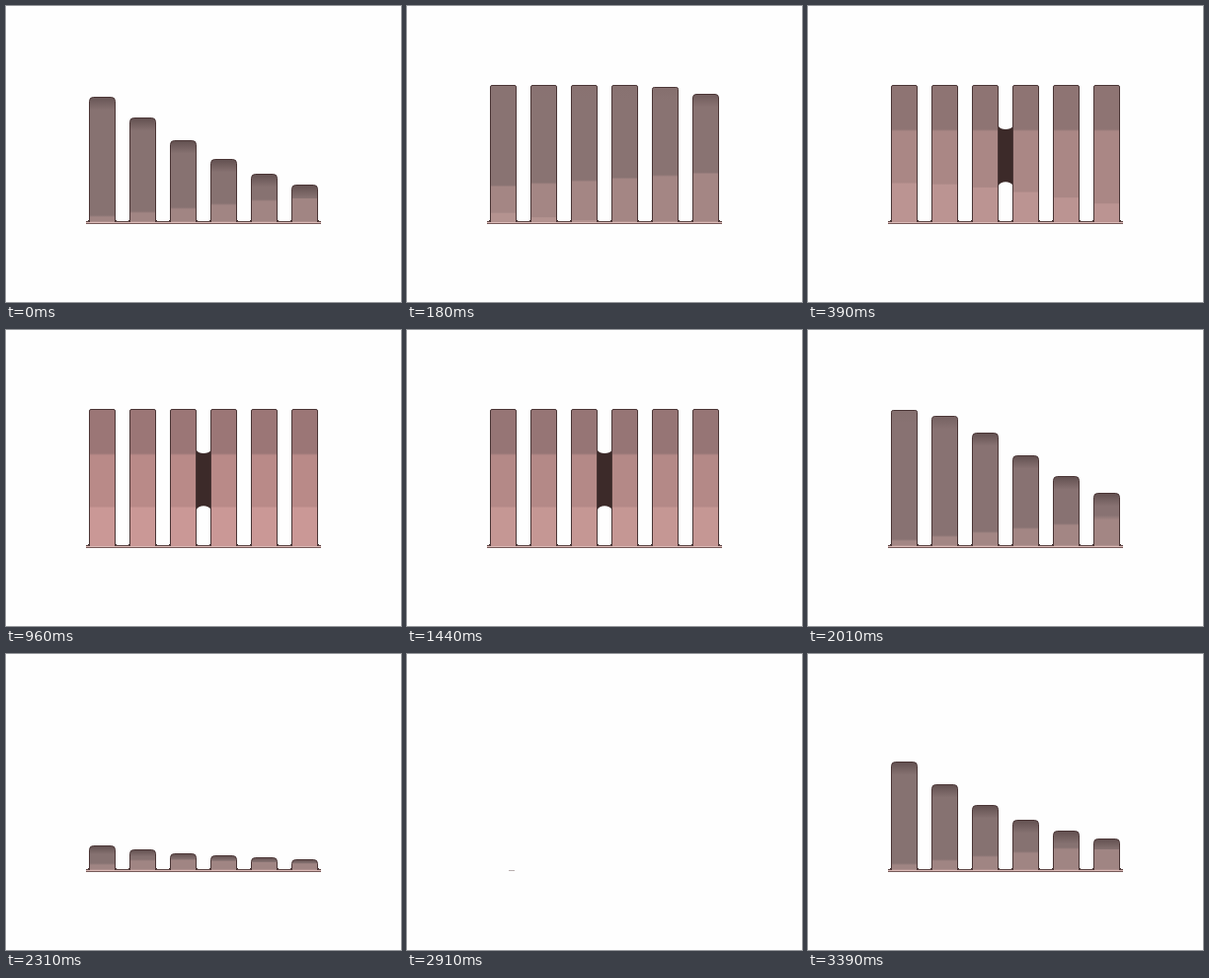
An HTML page with a canvas that plays this animation: 400x300 px, repeating every 3420 ms.

```html
<!DOCTYPE html>
<html lang="en">
<head>
<meta charset="utf-8">
<title>Rising fins</title>
<style>
  html, body { margin: 0; width: 100%; height: 100%; overflow: hidden; background: #fefefe; }
  canvas { display: block; width: 400px; height: 300px; }
</style>
</head>
<body>
<canvas id="stage" width="400" height="300"></canvas>
<script>
const ctx = document.getElementById('stage').getContext('2d');
const LOOP = 3420, STEP = 30, STEPS = LOOP / STEP;
const FLOOR = 218, FULL = 138, COUNT = 6, LEFT = 84, PITCH = 41, BAR_W = 27;
const PAPER = '#fefefe', EDGE = '#4b3636';
const SHADOW = [98, 80, 80];
const DIM = [[134, 114, 113], [160, 133, 131], [176, 146, 143]];
const BRIGHT = [[155, 118, 118], [185, 138, 136], [203, 152, 150]];

const clamp = (v, a = 0, b = 1) => Math.min(b, Math.max(a, v));
const mix = (a, b, p) => a + (b - a) * p;
const blend = (a, b, p) => a.map((v, i) => mix(v, b[i], p));
const rgb = c => `rgb(${c.map(Math.round).join()})`;
const ramp = (v, from, length) => {
  const p = clamp((v - from) / length);
  return p * p * (3 - 2 * p);
};

// A bell-shaped swell passes to the right while rising and back to the left while sinking
function height(i, f) {
  const u = Math.max(i - 0.86 * (f + 1), i - 2.24 + 0.83 * (f - 67));
  const x = 0.277 * (u + 1.88) - 0.04;
  const s = (x + Math.sqrt(x * x + 0.08)) / 2;
  return FULL / (1 + s * s) * ramp(f, -17, 9) * (1 - ramp(f, 78, 9));
}

// Edges of the tone bands climb while the fins stand and drop again fin by fin
function bands(i, f) {
  const fall = ramp(f, 55 + i, 8);
  const open = ramp(f, 2, 10) * (1 - fall);
  const glow = ramp(f, 3 + 1.05 * i, 10) * (1 - ramp(f, 56 - 0.9 * i, 9));
  return {
    upper: FLOOR - mix(5 + 4 * i, 92, open),
    lower: FLOOR - 38.5 * glow,
    soft: 2 + 72 * fall * (1 - fall)
  };
}

function tones(f) {
  const d = clamp((f - 35.6) / 40, -1, 1);
  const light = Math.cos(d * Math.PI / 2) ** 2;
  return DIM.map((c, i) => blend(c, BRIGHT[i], light));
}

function fin(i, f) {
  const h = height(i, f);
  if (h < 2) return;
  const x = LEFT + i * PITCH + 0.5, right = x + BAR_W - 1;
  const top = Math.round(FLOOR - h) + 0.5, bottom = FLOOR + 1;
  const r = Math.min(h / 2, mix(1.5, 4, clamp((FULL - h) / 12)));
  const [high, middle, low] = tones(f);
  const { upper, lower, soft } = bands(i, f);
  const split = Math.max(upper, top + h * 0.32);
  const dark = clamp((FULL - h) / 14);

  const fill = ctx.createLinearGradient(0, top, 0, bottom);
  let last = 0;
  const stop = (y, c) => {
    last = clamp((y - top) / (bottom - top), last, 1);
    fill.addColorStop(last, rgb(c));
  };
  stop(top, blend(high, SHADOW, dark));
  stop(top + Math.min(13, h * 0.35), high);
  stop(split - soft / 2, high);
  stop(split + soft / 2, middle);
  stop(lower - 0.5, middle);
  stop(lower + 0.5, low);

  ctx.beginPath();
  ctx.moveTo(x, bottom);
  ctx.lineTo(x, top + r);
  ctx.quadraticCurveTo(x, top, x + r, top);
  ctx.lineTo(right - r, top);
  ctx.quadraticCurveTo(right, top, right, top + r);
  ctx.lineTo(right, bottom);
  ctx.fillStyle = fill;
  ctx.fill();
  ctx.strokeStyle = EDGE;
  ctx.lineWidth = 1;
  ctx.stroke();
}

function rect(x, y, w, h, color) {
  ctx.fillStyle = color;
  ctx.fillRect(x, y, w, h);
}

function base(f) {
  const lit = ramp(f, -17, 6) * (1 - ramp(f, 81, 6));
  rect(81, FLOOR + 1, 238, 1, rgb(blend([185, 175, 175], [217, 184, 181], lit)));
  ctx.globalAlpha = lit;
  rect(81, FLOOR + 2, 238, 1, '#765a59');
  for (let i = 0; i <= COUNT; i++) {
    const a = i ? LEFT + (i - 1) * PITCH + BAR_W : 81;
    const b = i < COUNT ? LEFT + i * PITCH : 319;
    rect(a, FLOOR, b - a, 1, '#5f4746');
    if (i) rect(a, FLOOR - 1, 1, 1, EDGE);
    if (i < COUNT) rect(b - 1, FLOOR - 1, 1, 1, EDGE);
  }
  ctx.globalAlpha = 1;
}

function bridge(size) {
  const top = 152 - 30 * size, bottom = 152 + 30 * size;
  ctx.beginPath();
  ctx.moveTo(193, top);
  ctx.bezierCurveTo(195, top + 4 * size, 205, top + 4 * size, 207.5, top);
  ctx.lineTo(207.5, bottom);
  ctx.bezierCurveTo(205, bottom - 5 * size, 195, bottom - 5 * size, 193, bottom);
  ctx.fillStyle = '#3c2a29';
  ctx.fill();
}

function gap(size) {
  ctx.save();
  ctx.translate(124, 176);
  ctx.scale(1, size);
  ctx.beginPath();
  ctx.moveTo(0, -11);
  ctx.bezierCurveTo(4, -9, 2, -14, 8, -14);
  ctx.lineTo(15, -14);
  ctx.bezierCurveTo(20, -13, 18, -9, 26, -9);
  ctx.bezierCurveTo(28, -4, 28, 5, 26, 9);
  ctx.bezierCurveTo(21, 9, 20, 13, 14, 13);
  ctx.bezierCurveTo(8, 14, 5, 10, 0, 10);
  ctx.fillStyle = PAPER;
  ctx.fill();
  ctx.restore();
}

function draw(now) {
  const step = Math.floor(now % LOOP / STEP);
  const f = step > 90 ? step - STEPS : step;
  rect(0, 0, 400, 300, PAPER);
  if (f < -17 || f >= 87) return;

  // The floor line spreads from a short dash and closes again
  const spread = ramp(f, -17, 3) * (1 - ramp(f, 83, 5));
  const x0 = mix(103, 81, spread), x1 = mix(109, 319, spread);
  ctx.save();
  ctx.beginPath();
  ctx.rect(x0, 0, x1 - x0, 300);
  ctx.clip();
  bridge(ramp(f, 6, 5) * (1 - ramp(f, 50, 6)));
  for (let i = 0; i < COUNT; i++) fin(i, f);
  gap(ramp(f, 55, 4) * (1 - ramp(f, 59, 4)));
  base(f);
  ctx.restore();
}

const start = performance.now();
function tick() {
  draw(performance.now() - start);
  requestAnimationFrame(tick);
}
tick();
</script>
</body>
</html>
```
